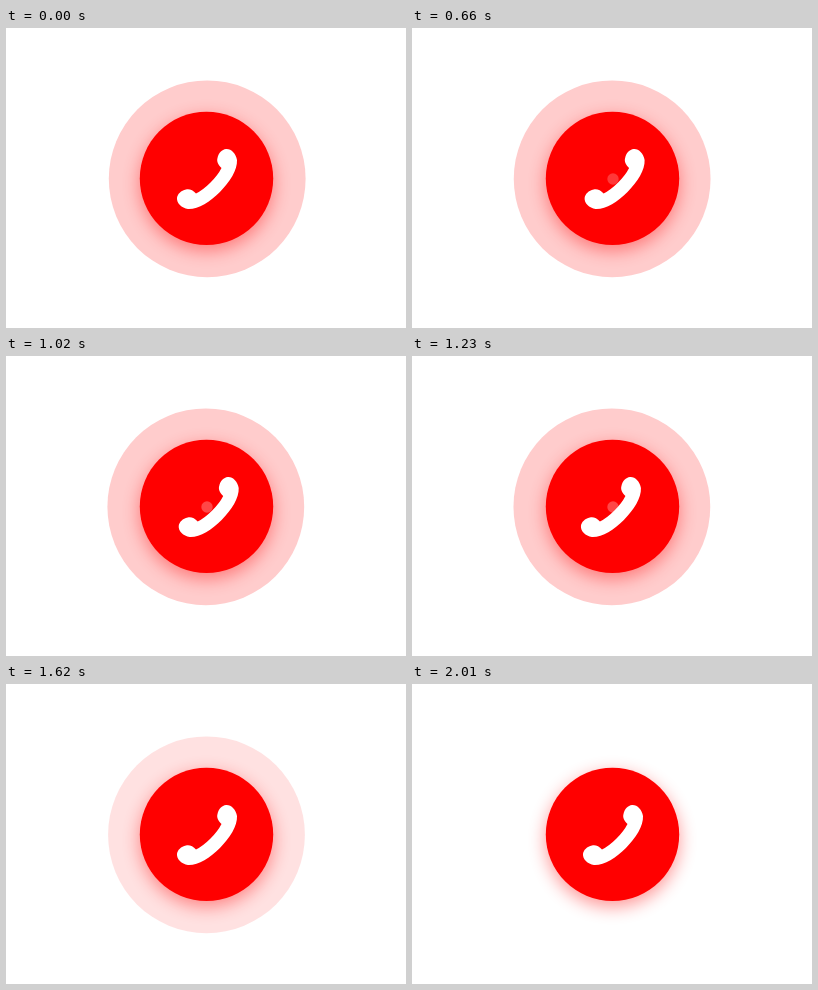
Animation, 400 px wide and 300 px high, one loop 2410 ms. Source, as an HTML page:

```html
<!DOCTYPE html>
<html lang="en">
<head>
<meta charset="utf-8">
<title>Ringing call button</title>
<style>
  html, body { margin: 0; width: 100%; height: 100%; overflow: hidden; background: #fff; }
  svg { display: block; width: 100%; height: 100%; }
</style>
</head>
<body>
<svg viewBox="0 0 400 300">
  <defs>
    <filter id="blur" x="-40%" y="-40%" width="180%" height="180%">
      <feGaussianBlur stdDeviation="8.5"/>
    </filter>
  </defs>
  <circle id="halo" cy="150.8" r="98.4" fill="#fcc"/>
  <circle cx="200.5" cy="156" r="67" fill="#f00" opacity=".4" filter="url(#blur)"/>
  <circle cx="200.5" cy="150.4" r="66.7" fill="#f00"/>
  <circle id="dot" cx="201" cy="151" r="5.7" fill="#fff"/>
  <path id="phone" fill="#fff" d="M3.5 3.5Q11 -4 14.5 -11C11 -14 9.5 -18 10.5 -21
    C11.5 -26 15 -29.5 19 -30C24 -30.5 29 -25.5 30 -19C30.5 -9 23 2.8 12.9 12.9
    C2.8 23 -9 30.5 -19 30C-25.5 29 -30.5 24 -30 19C-29.5 15 -26 11.5 -21 10.5
    C-18 9.5 -14 11 -11 14.5Q-4 11 3.5 3.5Z"/>
</svg>
<script>
const LOOP = 2410, STEP = 30;
const SHAKE_START = 420, SHAKE_END = 1516, SHAKE_PERIOD = 129;
const FADE_START = 1500, FADE_TIME = 510;
const [halo, dot, phone] = ["halo", "dot", "phone"].map(id => document.getElementById(id));

const clamp = v => Math.min(1, Math.max(0, v));
const ramp = (t, from, to) => clamp((t - from) / (to - from));

function shake(t) {
  if (t < SHAKE_START || t > SHAKE_END) return 0;
  return -2.1 * Math.sin(2 * Math.PI * (t - SHAKE_START) / SHAKE_PERIOD);
}

function draw(time) {
  const t = Math.floor((time % LOOP) / STEP) * STEP;
  const left = 1 - ramp(t, FADE_START, FADE_START + FADE_TIME);
  const drift = Math.sin(Math.PI * ramp(t, 210, 1910));

  halo.setAttribute("cx", 201.2 - 1.4 * drift);
  halo.setAttribute("opacity", left * left);
  dot.setAttribute("opacity", 0.28 * ramp(t, 450, 720) * (1 - ramp(t, 1260, 1530)));
  phone.setAttribute("transform", `translate(${201 + shake(t)} 151)`);
}

const start = performance.now();
function tick() {
  draw(performance.now() - start);
  requestAnimationFrame(tick);
}
tick();
</script>
</body>
</html>
```
